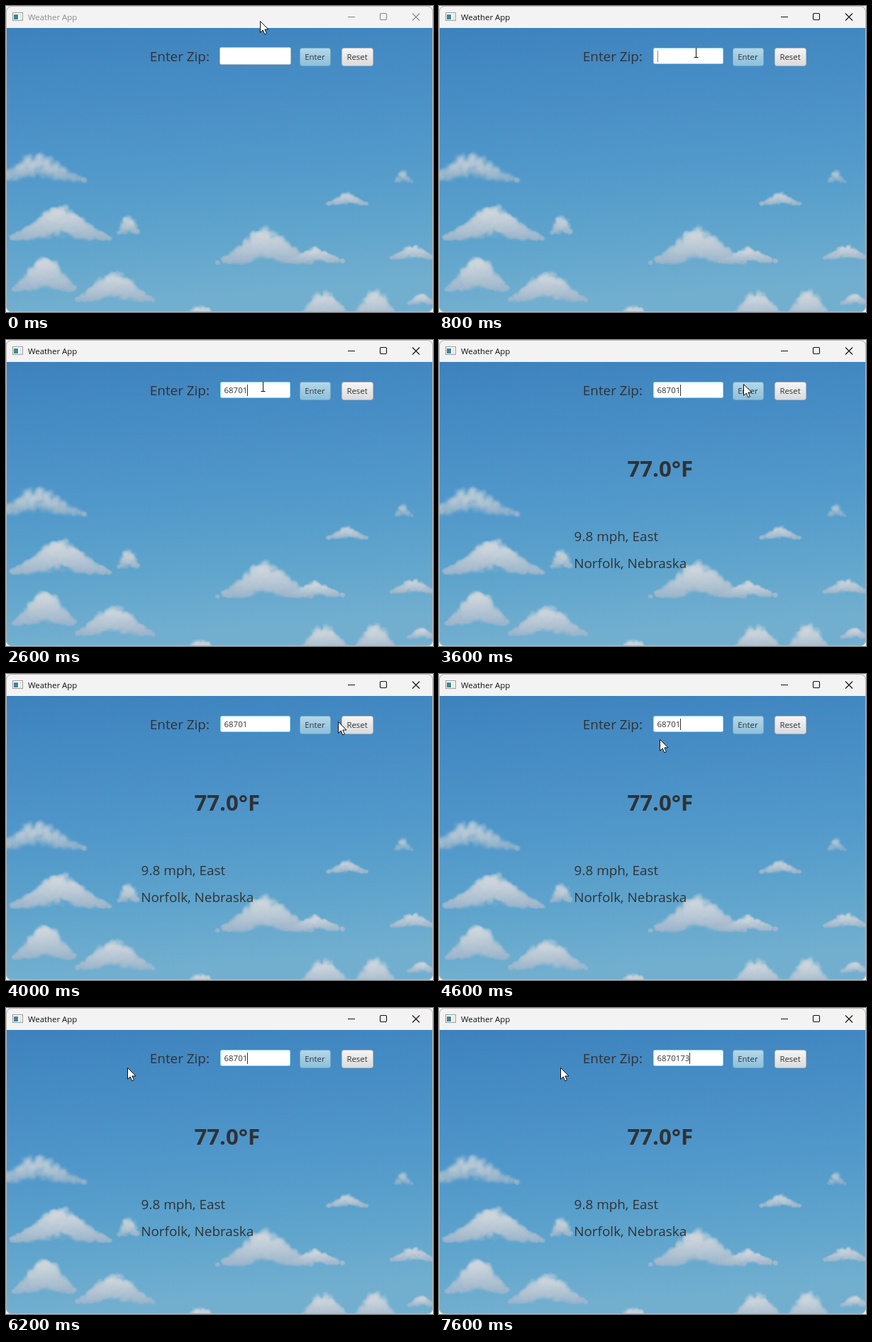
An HTML page with a canvas for the animation above (8 s loop, 602 by 432 pixels).

```html
<!DOCTYPE html>
<html lang="en">
<head>
<meta charset="utf-8">
<title>Weather App</title>
<style>
  html, body { margin: 0; width: 100%; height: 100%; overflow: hidden; background: #f4f4f4; }
  canvas, svg { position: absolute; left: 0; top: 0; width: 602px; height: 432px; display: block; }
  text { font-family: "Open Sans", "Noto Sans", sans-serif; fill: #303234; white-space: pre; }
  .small { font-size: 11.4px; }
  .label { font-size: 18.9px; }
  .temp { font-size: 31.2px; font-weight: 700; }
</style>
</head>
<body>
<canvas id="sky" width="602" height="432"></canvas>
<svg viewBox="0 0 602 432">
  <defs>
    <linearGradient id="blue" x2="0" y2="1">
      <stop stop-color="#b3d8ea"/><stop offset="1" stop-color="#8dbfd9"/>
    </linearGradient>
    <linearGradient id="gray" x2="0" y2="1">
      <stop stop-color="#f6f6f6"/><stop offset="1" stop-color="#dadada"/>
    </linearGradient>
  </defs>

  <path d="M0 31V8a8 8 0 0 1 8-8H594a8 8 0 0 1 8 8V31z" fill="#f3f3f3"/>
  <rect x=".5" y=".5" width="601" height="431" rx="7.5" fill="none" stroke="#bcb8b4"/>

  <rect x="9.5" y="9.5" width="14" height="11" fill="#fafafa" stroke="#9a9c9e"/>
  <rect x="11" y="12" width="6" height="7" fill="#3f8791"/>
  <path d="M19 12.5h3M19 15.5h3M19 18.5h3" stroke="#c4c8ca"/>
  <text id="title" class="small" x="31" y="20">Weather App</text>
  <g id="controls" fill="none" stroke-width="1.1">
    <path d="M482 15.5h10M573 10.5l10 10M583 10.5l-10 10"/>
    <rect x="527.5" y="10.5" width="9" height="9" rx="1.2"/>
  </g>

  <text class="label" x="202.8" y="78">Enter Zip:</text>
  <rect id="field" rx="2" fill="#fff"/>
  <text id="zip" class="small" x="307.6" y="75"></text>
  <path id="caret" d="M.5 63V79"/>

  <rect x="414.5" y="59.5" width="43" height="25" rx="3" fill="url(#blue)" stroke="#75a9c6"/>
  <text class="small" x="421.2" y="76">Enter</text>
  <rect x="473.5" y="59.5" width="44" height="25" rx="3" fill="url(#gray)" stroke="#b4b9bd"/>
  <text class="small" x="480.4" y="76">Reset</text>

  <g id="report">
    <text class="temp" x="265.4" y="193">77.0°F</text>
    <text class="label" x="190.6" y="284">9.8 mph, East</text>
    <text class="label" x="190.2" y="322">Norfolk, Nebraska</text>
  </g>

  <path id="arrow" d="M.5 .5V16.5L4.2 13 6.8 19 9.4 17.9 6.9 12H12z" fill="#fff" stroke="#111"/>
  <path id="beam" d="M.5 -7V6.5M-2.5 6.5H3.5" fill="none" stroke="#111"/>
  <path id="ghost" d="M-4 -8.5H5M.5 -8.5V9.5M-4 9.5H5" fill="none" stroke="#8b8f9c" opacity=".6"/>
</svg>
<script>
const LOOP = 8000, STEP = 200;
const $ = id => document.getElementById(id);
const clamp = (v, lo, hi) => Math.max(lo, Math.min(hi, v));
const mix = (a, b, t) => a + (b - a) * t;

// Sky
let seed = 11;
const rnd = () => (seed = seed * 16807 % 2147483647) / 2147483647;

// centre, base, width, height
const CLOUDS = [
  [45, 249, 146, 46], [76, 331, 150, 52], [173, 322, 34, 28], [55, 403, 94, 55],
  [153, 417, 114, 46], [366, 364, 140, 54], [436, 362, 88, 22], [574, 357, 68, 21],
  [481, 281, 64, 19], [560, 249, 28, 18], [274, 446, 60, 26], [449, 442, 86, 42],
  [520, 442, 72, 43], [586, 421, 44, 16]
];

function puff(g, x, y, r, rgb, a) {
  const grad = g.createRadialGradient(x, y, 0, x, y, r);
  grad.addColorStop(0, `rgba(${rgb},${a})`);
  grad.addColorStop(.5, `rgba(${rgb},${a * .7})`);
  grad.addColorStop(1, `rgba(${rgb},0)`);
  g.fillStyle = grad;
  g.fillRect(x - r, y - r, 2 * r, 2 * r);
}

// Round lobes under a dome; clouds near the horizon are denser.
function cloud(g, [cx, base, w, h]) {
  const density = mix(.1, .42, clamp((base - 240) / 90, 0, 1)) * clamp(w / 80, .5, 1);
  const lobes = Math.round(w / 5) + 4;
  for (let i = 0; i < lobes; i++) {
    const u = (i + rnd()) / lobes * 2 - 1;
    const dome = h * (.35 * Math.sqrt(1 - u * u) + .65 * Math.exp(-((u / .5) ** 2)));
    const size = Math.min(h * .26, dome * .5);
    const rise = Math.max(0, dome - 2 * size);
    const lift = rise * Math.sqrt(rnd());
    for (let j = 0; j < 26; j++) {
      const angle = rnd() * 2 * Math.PI, d = size * .75 * Math.sqrt(rnd());
      const x = cx + u * (w / 2 - size) + Math.cos(angle) * d * 1.3;
      const y = base - size - (j % 2 ? lift : rnd() * rise) + Math.sin(angle) * d;
      const light = clamp((base - y) / h * 1.4, 0, 1);
      const rgb = [[152, 207], [179, 214], [202, 220]].map(([lo, hi]) => Math.round(mix(lo, hi, light)));
      puff(g, x, y, 2.5 + size * .3, rgb, density * mix(.5, 1, light));
    }
  }
}

function paintSky() {
  const g = $("sky").getContext("2d");
  g.beginPath();
  g.roundRect(0, 0, 602, 432, 8);
  g.clip();
  const grad = g.createLinearGradient(0, 31, 30, 432);
  ["#3d82bd", "#478dc5", "#5097ca", "#5da3cc", "#72afcf"]
    .forEach((color, i) => grad.addColorStop(i / 4, color));
  g.fillStyle = grad;
  g.fillRect(0, 0, 602, 432);
  CLOUDS.forEach(c => cloud(g, c));
}

// Pointer stops: time, x, y
const STOPS = [
  [200, 358, 21], [600, 362, 66], [3000, 362, 66], [3600, 429, 62],
  [4200, 488, 70], [4600, 311, 92], [5200, 173, 85], [5400, 171, 84]
];
const DIGITS = "6870173", DIGIT_WIDTH = 6.48;

function pointerAt(t) {
  const next = STOPS.findIndex(s => s[0] > t);
  if (next <= 0) return STOPS.at(next).slice(1);
  const [t0, x0, y0] = STOPS[next - 1], [t1, x1, y1] = STOPS[next];
  const k = (t - t0) / (t1 - t0);
  return [Math.round(mix(x0, x1, k)), Math.round(mix(y0, y1, k))];
}

function pointerKind(t, x, y) {
  if (t >= 5200 && t < 5400) return "ghost";
  return x > 302 && x < 400 && y > 58 && y < 83 ? "beam" : "arrow";
}

// One digit per step from a start time
const typedSince = (t, from, max) => clamp(Math.floor((t - from) / STEP) + 1, 0, max);

const set = (id, attrs) => {
  for (const k in attrs) $(id).setAttribute(k, attrs[k]);
};
const show = (id, on) => set(id, { visibility: on ? "visible" : "hidden" });

function render(t) {
  const active = t >= 200;
  $("title").style.fill = active ? "#111" : "#8b8b8b";
  set("controls", { stroke: active ? "#111" : "#868686" });
  set("field", active
    ? { x: 302.5, y: 59.5, width: 98, height: 22, stroke: "#8fdcf3" }
    : { x: 301.5, y: 58.5, width: 100, height: 24, stroke: "#b3bcc4" });

  const typed = typedSince(t, 1400, 5) + typedSince(t, 7400, 2);
  $("zip").textContent = DIGITS.slice(0, typed);
  set("caret", {
    transform: `translate(${Math.round(307.8 + typed * DIGIT_WIDTH)} 0)`,
    stroke: typed ? "#333" : "#888"
  });
  const blinkedOff = t >= 3200 && t < 7400 && (t + 200) % 1000 < 400;
  show("caret", active && !blinkedOff);

  show("report", t >= 3600);

  const [x, y] = pointerAt(t), kind = pointerKind(t, x, y);
  ["arrow", "beam", "ghost"].forEach(id => show(id, id === kind));
  set(kind, { transform: `translate(${x} ${y})` });
}

paintSky();
const start = performance.now();
let last = -1;
function tick() {
  const t = Math.floor((performance.now() - start) % LOOP / STEP) * STEP;
  if (t !== last) render(last = t);
  requestAnimationFrame(tick);
}
tick();
</script>
</body>
</html>
```
